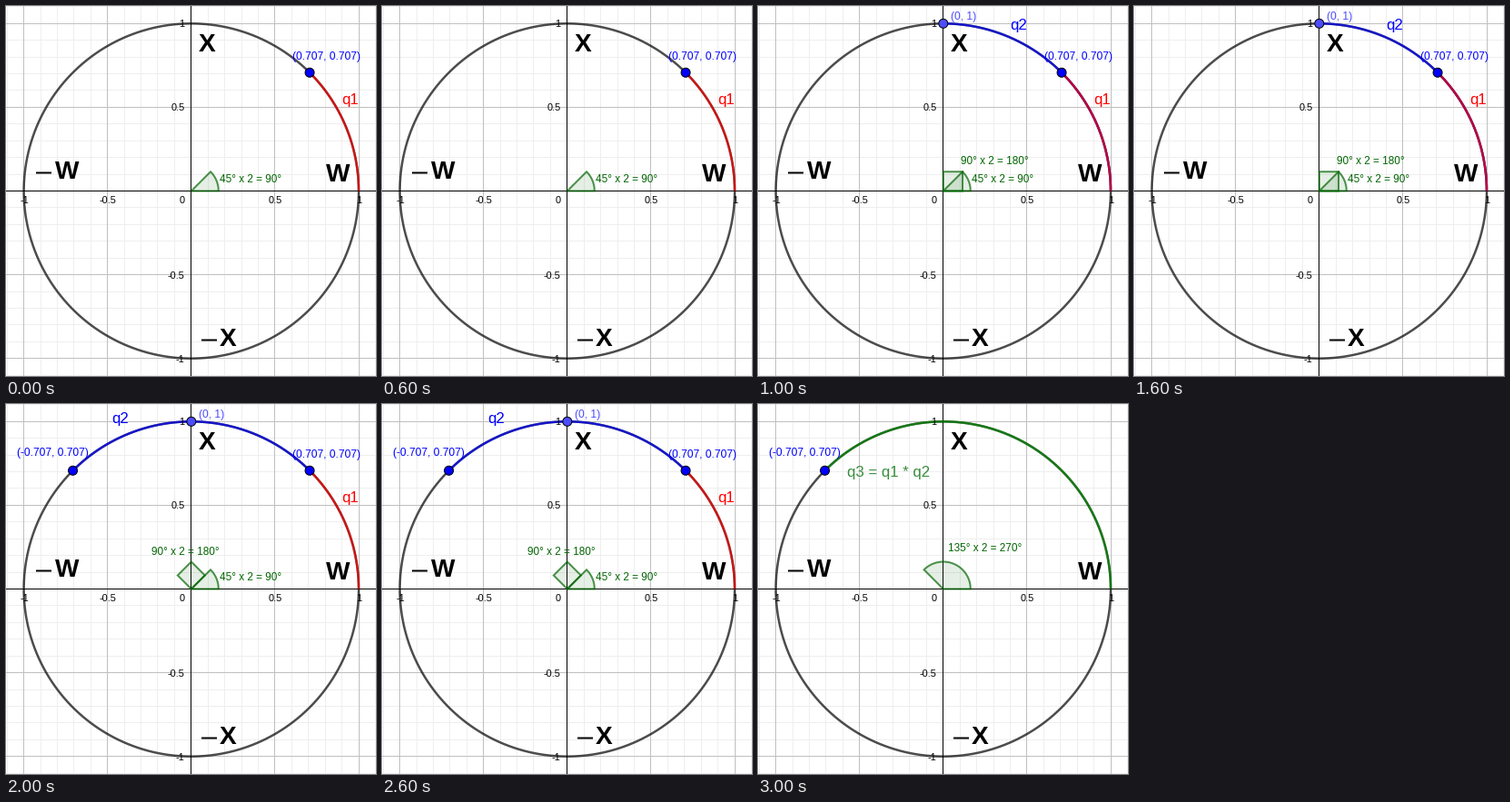
A matplotlib script that plays this animation: 407x407 px, repeating every 4000 ms.

```python
import numpy as np
import matplotlib.pyplot as plt
from matplotlib.animation import FuncAnimation
from matplotlib.patches import Circle, Polygon

SIZE, DPI = 407, 100
CX, CY, UNIT = 203.8, 203.5, 184.2
ANGLE_RADIUS = 30
PX = 72 / DPI  # points per pixel

RED, BLUE, GREEN = "#ff0000", "#0000ff", "#008c00"
PALE_BLUE, DARK_GREEN, PALE_GREEN = "#4d4dff", "#006400", "#388e3c"

plt.rcParams["font.family"] = "Liberation Sans"
plt.rcParams["text.kerning_factor"] = 6  # no pair kerning
plt.rcParams["toolbar"] = "None"
fig = plt.figure(figsize=(SIZE / DPI, SIZE / DPI), dpi=DPI, facecolor="white")
ax = fig.add_axes([0, 0, 1, 1])


def polar(degrees, radius=UNIT):
    t = np.radians(degrees)
    return CX + radius * np.cos(t), CY - radius * np.sin(t)


def label(x, y, text, size=12, color="black", **style):
    ax.text(x, y, text, fontsize=size * PX, color=color, va="baseline",
            zorder=6, **style)


def arc(start, end, color):
    x, y = polar(np.linspace(start, end, 200))
    ax.plot(x, y, color=color, lw=2.5 * PX, alpha=0.7, zorder=3,
            solid_capstyle="butt")


def point(degrees, color=BLUE):
    ax.add_patch(Circle(polar(degrees), 5, fc=color, ec="black",
                        lw=PX, zorder=5))


def marker(outline):
    ax.add_patch(Polygon(outline, fc=DARK_GREEN, ec="none", alpha=0.1, zorder=4))
    ax.add_patch(Polygon(outline, fill=False, ec=DARK_GREEN, lw=2 * PX,
                         alpha=0.7, zorder=4, snap=False))


def sector(end):
    rim = np.column_stack(polar(np.linspace(0, end, 60), ANGLE_RADIUS))
    marker(np.vstack([(CX, CY), rim]))


def right_angle(start):
    side = ANGLE_RADIUS / np.sqrt(2)
    marker([(CX, CY), polar(start, side),
            polar(start + 45, ANGLE_RADIUS), polar(start + 90, side)])


def angle_label(x, y, text):
    label(x, y, text, 11.8, DARK_GREEN)


def draw_plane():
    ax.set(xlim=(0, SIZE), ylim=(SIZE, 0))
    ax.axis("off")
    for k in range(-11, 12):
        major = k % 5 == 0
        color = "black" if k == 0 else "#c0c0c0" if major else "#eeeeee"
        style = dict(color=color, lw=PX, snap=False,
                     zorder=2 if k == 0 else 1 if major else 0)
        # Pixel centres keep the one-pixel lines crisp.
        ax.axvline(np.floor(CX + k * UNIT / 10) + 0.5, **style)
        ax.axhline(np.floor(CY + k * UNIT / 10) + 0.5, **style)

    for value in (-1, -0.5, 0.5, 1):
        text = f"{value:g}"
        label(CX + value * UNIT + 0.7, 217, text, 11, ha="center")
        label(196.5, CY - value * UNIT + 4, text, 11, ha="right")
    label(190.5, 217, "0", 11)

    for x, y, letter in ((352, 193, "W"), (53.5, 190, "W"),
                         (212, 50, "X"), (235, 374, "X")):
        label(x, y, letter, 28, weight="bold")
    for x, y in ((33, 183.5), (215, 367.5)):
        ax.plot([x, x + 17], [y, y], color="black", lw=2 * PX, zorder=6,
                solid_capstyle="butt", snap=False)

    arc(0, 360, "black")


def draw_first_rotation():
    arc(0, 45, RED)
    sector(45)
    point(45)
    label(315, 59, "(0.707, 0.707)", color=BLUE)
    label(369.5, 108, "q1", 16.8, RED)
    angle_label(235, 194, "45° x 2 = 90°")


def draw_second_rotation(start, arc_start, name_at, angle_at):
    arc(arc_start, start + 90, BLUE)
    right_angle(start)
    point(90, PALE_BLUE)
    label(212, 15, "(0, 1)", color=PALE_BLUE)
    label(*name_at, "q2", 16.8, BLUE)
    angle_label(*angle_at, "90° x 2 = 180°")


def draw_end_point():
    point(135)
    label(12, 57, "(-0.707, 0.707)", color=BLUE)


def draw_product():
    arc(0, 135, GREEN)
    sector(135)
    draw_end_point()
    label(98.5, 80, "q3 = q1 * q2", 16.8, PALE_GREEN)
    angle_label(209, 162, "135° x 2 = 270°")


def update(step):
    ax.clear()
    draw_plane()
    if step == 1:
        draw_second_rotation(0, 0, (277, 26), (223, 174))
    elif step == 2:
        draw_second_rotation(45, 45, (116, 21), (160, 166))
        draw_end_point()
    if step < 3:
        draw_first_rotation()
    else:
        draw_product()
    return []


anim = FuncAnimation(fig, update, frames=4, init_func=lambda: [],
                     interval=1000, repeat=True, repeat_delay=0)
plt.show()
```
